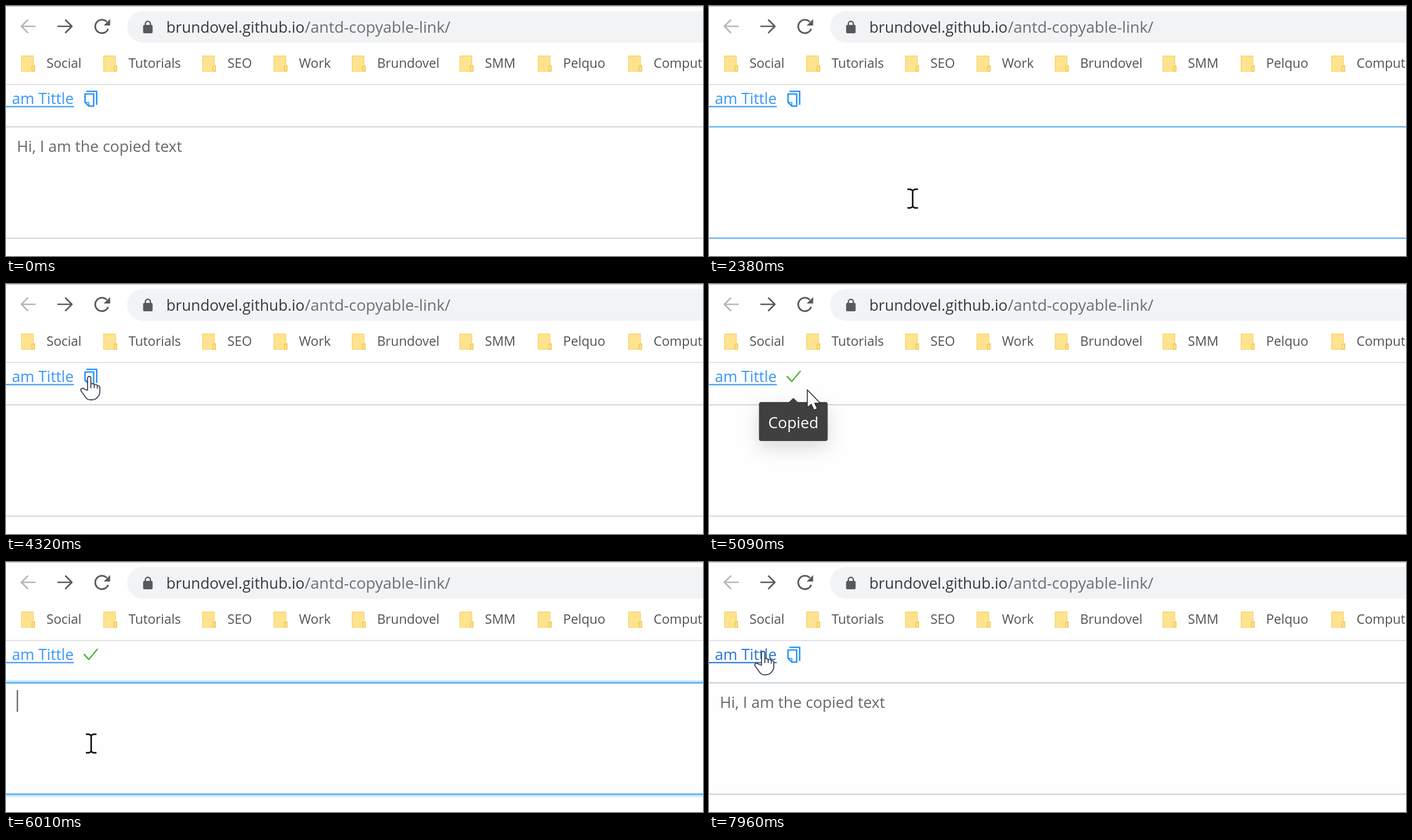
These frames come from a looping animation (1248x449 px, 8 s). An HTML page:

```html
<!DOCTYPE html>
<html lang="en">
<head>
<meta charset="utf-8">
<title>Copyable link</title>
<style>
  html, body { margin: 0; width: 100%; height: 100%; overflow: hidden; background: #fff; }
  svg { display: block; width: 100vw; height: 100vh; font-family: "Open Sans", "Noto Sans", sans-serif; }
  .line { fill: none; stroke-linejoin: round; }
</style>
</head>
<body>
<svg viewBox="0 0 1248 449">
  <defs>
    <filter id="shadow" x="-60%" y="-80%" width="220%" height="280%">
      <feDropShadow dx="0" dy="12" stdDeviation="16" flood-opacity=".14"/>
    </filter>
    <g id="folder" stroke="#f5d672" stroke-width="1.4">
      <path d="M.8 .8H22V18H24.4V28.4H.8Z" fill="#ffe38f"/>
      <rect x="19.5" y="19" width="4.7" height="9.2" rx="1" fill="#ffe38f" stroke="#f0c64c"/>
    </g>
  </defs>

  <rect width="1248" height="449" fill="#fff"/>
  <rect y="141" width="1248" height="308" fill="#fefefe"/>
  <rect width="1248" height="1.4" fill="#c9c9c9"/>
  <rect y="140.2" width="1248" height="1.5" fill="#d9dadb"/>

  <g class="line" stroke-width="2.7">
    <path d="M53 36.5H28M39.5 24.5L27.5 36.5L39.5 48.5" stroke="#b4b5b7"/>
    <path d="M92 36.5H117M106 24.5L118 36.5L106 48.5" stroke="#56595d"/>
    <g stroke="#56595d" stroke-width="3">
      <g id="reload">
        <path d="M183 41A12 12 0 1 1 180.5 28.5"/>
        <path d="M186.5 23.5V35H175Z" fill="#56595d" stroke="none"/>
      </g>
      <path id="stop" d="M162.5 27.5L181.5 46.5M181.5 27.5L162.5 46.5"/>
    </g>
  </g>
  <rect x="217" y="9" width="1100" height="57" rx="28.5" fill="#f1f3f4"/>
  <rect x="245.5" y="34" width="17" height="15" rx="2" fill="#55585c"/>
  <path class="line" d="M249.5 35V32a4.5 4.5 0 0 1 9 0V35" stroke="#55585c" stroke-width="2.4"/>
  <text x="287" y="47.5" font-size="27.1" fill="#37393d">brundovel.github.io</text>
  <text x="535" y="47.5" font-size="28" fill="#6c6f73">/antd-copyable-link/</text>
  <g id="bookmarks" font-size="23.3" fill="#4f5256"></g>

  <g id="page">
    <g id="link">
      <text x="10.5" y="176" font-size="27.2">am Tittle</text>
      <rect y="179.6" width="121.5" height="2.2"/>
    </g>
    <g class="line" stroke-width="2.6">
      <g id="copy" stroke="#2593fb">
        <path d="M144 153.3H162.3V177.5M141.5 158H157V179.7H148.5L141.5 173Z"/>
        <path d="M142 173.3H148.4V179" stroke-width="1.6"/>
      </g>
      <path id="check" stroke="#50b83c" d="M139.5 165.5L148.3 175L164 156"/>
    </g>
    <rect id="glow" x="-20" y="214.5" width="1290" height="205" fill="none" stroke="#1890ff" stroke-opacity=".2" stroke-width="5"/>
    <rect id="area" x="-20" y="217" width="1290" height="200" fill="#fefefe" stroke-width="2.4"/>
    <text id="copied" x="19.5" y="262" font-size="27.6" fill="#66686a">Hi, I am the copied text</text>
    <rect id="caret" x="19.3" y="230" width="2.2" height="39" fill="#55585c"/>
    <g id="tip" filter="url(#shadow)">
      <path d="M142 213L151 204.5L160 213Z" fill="#404040"/>
      <rect id="tipBox" y="212" height="70" rx="4" fill="#404040"/>
      <text id="tipText" x="151" y="259" font-size="27.5" fill="#fff" text-anchor="middle"></text>
    </g>
  </g>

  <g id="cursor" stroke-linejoin="round">
    <g id="hand" stroke="#3d4452" stroke-width="1.8" fill="#fff">
      <path d="M-3 25V3a3 3 0 0 1 6 0V14q3-3 6 1q4-2 6 2q4-1 4 3V28q0 5-4 9q-3 5-10 5h-3q-5 0-8-4L-14 27q-2-3 0-5q3-2 6 1z"/>
      <path d="M3 14v7M9 15v6M14.5 17v5" fill="none"/>
    </g>
    <path id="arrow" d="M0 0V32L7 26L12 36.5L18 34L13.3 24H23Z" fill="#fff" stroke="#26282c" stroke-width="1.6"/>
    <path id="beam" d="M-9.5-16.7H-4L0-14.5L4-16.7H9.5M-9.5 16.7H-4L0 14.5L4 16.7H9.5M0-15V15" fill="none" stroke="#111" stroke-width="2.8"/>
  </g>
</svg>
<script>
const LOOP = 8000;
const el = id => document.getElementById(id);
const show = (id, on) => el(id).style.display = on ? '' : 'none';
const within = (t, from, to) => t >= from && t < to;
const clamp = p => Math.max(0, Math.min(1, p));
const ease = p => p * p * (3 - 2 * p);
const mix = (a, b, p) => `rgb(${a.map((v, i) => Math.round(v + (b[i] - v) * p))})`;

// Fades in from one moment and out again from another, like a CSS transition.
const pulse = (t, on, off, length = 300) => clamp((t - on) / length) - clamp((t - off) / length);

const MOVES = [
  { from: 2150, to: 2920, x: 66, y: 175 },    // up to the link
  { from: 3170, to: 3400, x: 85, y: 175 },
  { from: 3640, to: 4320, x: 149, y: 166 },   // copy icon
  { from: 4780, to: 5090, x: 176, y: 190 },
  { from: 5090, to: 6010, x: 152.5, y: 326 }, // text area
  { from: 6560, to: 7560, x: 107, y: 134 },
  { from: 7560, to: 7960, x: 97, y: 160.5 }   // back on the link
];

function cursorAt(t) {
  let x = 447, y = 393;
  for (const move of MOVES) {
    const p = ease(clamp((t - move.from) / (move.to - move.from)));
    x += (move.x - x) * p;
    y += (move.y - y) * p;
  }
  return [x, y];
}

function cursorKind(x, y) {
  if (y > 217 && y < 417) return 'beam';
  const clickable = y > 148 && y < 186 && (x < 122 || (x > 138 && x < 166));
  return clickable ? 'hand' : 'arrow';
}

const bookmarks = {
  Social: 27, Tutorials: 174, SEO: 351, Work: 479, Brundovel: 619, SMM: 812, Pelquo: 952, Computers: 1114
};
el('bookmarks').innerHTML = Object.entries(bookmarks).map(([name, x]) =>
  `<use href="#folder" x="${x}" y="89"/><text x="${x + 45.5}" y="111.2">${name}</text>`).join('');

function drawTip(label, opacity) {
  show('tip', opacity > 0);
  if (opacity <= 0) return;
  el('tip').setAttribute('opacity', opacity);
  el('tipText').textContent = label;
  const width = el('tipText').getComputedTextLength() + 33;
  el('tipBox').setAttribute('x', 151 - width / 2);
  el('tipBox').setAttribute('width', width);
}

function draw(t) {
  const loading = within(t, 1060, 1520);
  show('stop', loading);
  show('reload', !loading);
  show('page', !within(t, 1370, 1440));

  const checked = within(t, 4700, 7700);
  show('check', checked);
  show('copy', !checked);
  show('copied', !within(t, 1370, 6330));
  show('caret', within(t, 5840, 6330));
  drawTip(checked ? 'Copied' : 'Copy', pulse(t, 4330, 5095, 150));

  const pressed = pulse(t, 2950, 3050, 100) + pulse(t, 7700, LOOP, 250);
  const highlighted = pulse(t, 2150, 2600) + pulse(t, 5200, 7700);
  el('link').setAttribute('fill', mix([58, 151, 247], [38, 116, 213], pressed));
  el('area').setAttribute('stroke', mix([217, 217, 217], [64, 169, 255], highlighted));
  el('glow').setAttribute('opacity', pulse(t, 5700, 7650));

  const [x, y] = cursorAt(t), kind = cursorKind(x, y);
  show('cursor', within(t, 2150, 6330) || t >= 6560);
  el('cursor').setAttribute('transform', `translate(${x} ${y})`);
  for (const shape of ['hand', 'arrow', 'beam']) show(shape, shape === kind);
}

const start = performance.now();
function tick() {
  draw((performance.now() - start) % LOOP);
  requestAnimationFrame(tick);
}
tick();
</script>
</body>
</html>
```
